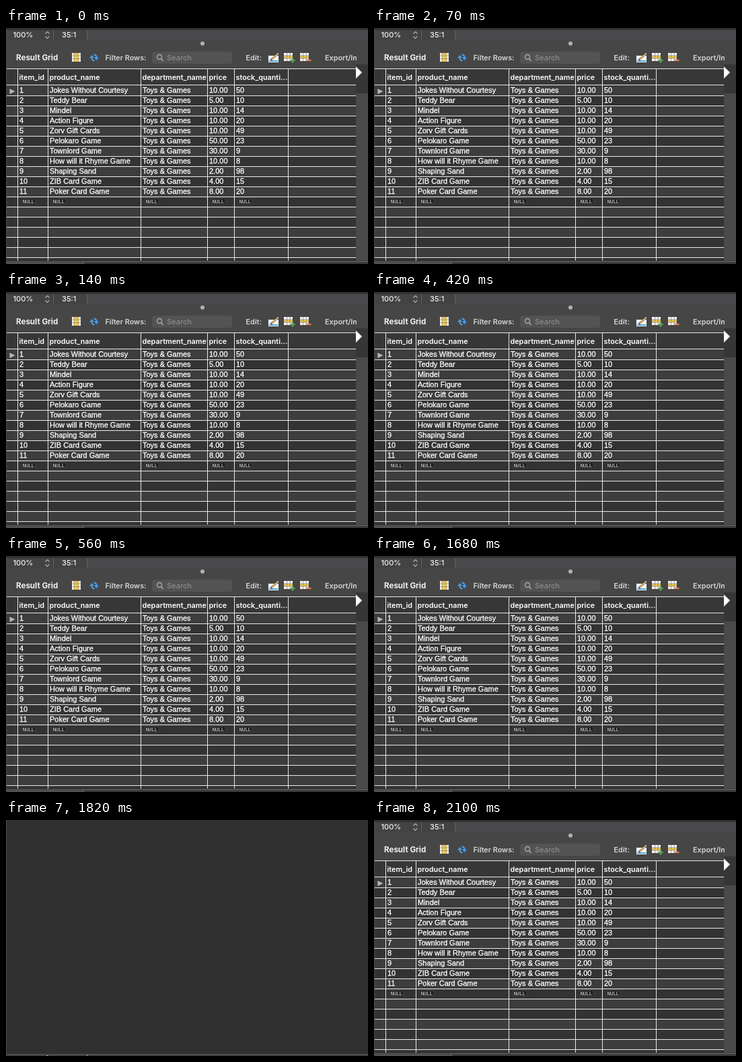
An HTML page for the animation above (2.38 s loop, 538 by 350 pixels).

```html
<!DOCTYPE html>
<html lang="en">
<head>
<meta charset="utf-8">
<title>Result grid</title>
<style>
html, body { margin: 0; width: 100%; height: 100%; overflow: hidden; background: #303030; }
svg { display: block; width: 538px; height: 350px; }
text { white-space: pre; }
.ui { font: 500 11px Inter, sans-serif; fill: #f2f2f2; }
.head { font: 600 10.8px Inter, sans-serif; fill: #fff; }
.label { font: 600 10.8px Inter, sans-serif; fill: #d4d4d4; }
.title { font: 700 11.6px Inter, sans-serif; fill: #f0f0f0; }
.cell { font: 11px "Liberation Sans", Arial, sans-serif; fill: #fff; stroke: #fff; stroke-width: .3px; }
.null { font: 7.2px "DejaVu Sans Mono", monospace; fill: #e4e4e4; }
#panel { animation: blink 2380ms step-end infinite; }
@keyframes blink {
  0% { visibility: visible; }
  76.4706% { visibility: hidden; }
  88.2353%, 100% { visibility: visible; }
}
</style>
</head>
<body>
<svg viewBox="0 0 538 350">
  <defs>
    <clipPath id="toolClip"><path d="M0 0H521V60H0z"/></clipPath>
    <g id="rows">
      <path fill="#f4f4f4" d="M0 0h13v12H0z"/>
      <path fill="#edc64a" d="M0 4h13v4H0z"/>
      <path stroke="#8b8b8b" stroke-width=".8" d="M0 4h13M0 8h13M4.5 0v12M9 0v12"/>
    </g>
  </defs>

  <!-- empty window -->
  <path fill="#303030" d="M0 0H538V350H0z"/>
  <path fill="#4a4a4a" d="M0 0h1v350H0z"/>
  <path fill="#585858" d="M0 347h538v1H0z"/>
  <path fill="#404040" d="M0 348h538v2H0z"/>
  <path fill="#a0a0a0" d="M60 349h3v1h-3zM120 348h1v2h-1z"/>

  <g id="panel">
    <!-- status bar and toolbar -->
    <path fill="#434343" d="M1 3H120V18H1z"/>
    <path fill="#4a4a4d" d="M120 3H538V18H120z"/>
    <path fill="#464646" d="M1 18H538V61H1z"/>
    <path fill="#606060" d="M70 3h1v15h-1zM120 3h1v15h-1z"/>
    <text class="ui" x="10.5" y="14">100%</text>
    <path fill="none" stroke="#b5b5b5" stroke-width="1.1" d="M58.5 8.5l3-3 3 3M58.5 12.5l3 3 3-3"/>
    <text class="ui" x="83" y="14">35:1</text>
    <circle cx="292" cy="23" r="3" fill="#b4b4b4"/>

    <g clip-path="url(#toolClip)">
      <text class="title" x="15" y="48">Result Grid</text>
      <text class="label" x="147.5" y="48">Filter Rows:</text>
      <text class="label" x="356.5" y="48">Edit:</text>
      <text class="label" x="474" y="48">Export/Import:</text>
    </g>

    <path fill="#f4f4f4" d="M98 37h13v13H98z"/>
    <path fill="#edc64a" d="M101 37h7v13h-7z"/>
    <path stroke="#8b8b8b" stroke-width=".7" d="M98 41h13M98 45.5h13M101 37v13M108 37v13"/>

    <path fill="none" stroke="#4c9bea" stroke-width="2" d="M127.5 44q0 4.5 4 4.5M134.5 44q0-4.5-4-4.5"/>
    <path fill="#4c9bea" d="M124 44.5h7l-3.5-4.5zM131 43.5h7l-3.5 4.5z"/>

    <rect x="217" y="35" width="119" height="18" rx="4" fill="#535353"/>
    <circle cx="228" cy="43" r="3.5" fill="none" stroke="#b0b0b0" stroke-width="1.3"/>
    <path stroke="#b0b0b0" stroke-width="1.4" d="M230.5 45.5l3 3.5"/>
    <text class="ui" x="239" y="48" style="fill:#8c8c8c">Search</text>

    <path fill="#f4f4f4" d="M390 41h15v10h-15z"/>
    <path fill="#5ba0de" d="M391 48h13v2h-13z"/>
    <path stroke="#555" stroke-width="2.8" d="M393.5 47.5l11.5-10"/>
    <path stroke="#e3b468" stroke-width="1.8" d="M395 46.2l10-8.7"/>

    <use href="#rows" x="413" y="37"/>
    <path fill="none" stroke="#6aa84a" stroke-width="2.2" d="M422.5 48h7M426 44.5v7"/>
    <use href="#rows" x="437" y="37"/>
    <path stroke="#e07a48" stroke-width="2.2" d="M446.5 48h7"/>

    <!-- table -->
    <path fill="#373737" d="M1 61H520V85H1z"/>
    <path fill="#333" d="M1 85H520V345H1z"/>
    <g id="table"></g>
    <path fill="#b5b5b5" d="M5.5 90v8l8-4z"/>

    <!-- side strip and bottom edge -->
    <path fill="#363636" d="M520 54h18v43h-18z"/>
    <path fill="#4a4a4a" d="M520 97h18v248h-18z"/>
    <path fill="#fff" d="M520 57v18l9-9z"/>
    <path fill="#393939" d="M1 345H538V350H1z"/>
    <path fill="#505050" d="M1 346H115V350H1z"/>
    <path fill="#6a6a6a" d="M115 346H538V347H116V350H115z"/>
  </g>
</svg>
<script>
const table = document.getElementById("table");
const lineColor = "#e8e8e8";

function add(tag, attrs, content = "") {
  const el = document.createElementNS("http://www.w3.org/2000/svg", tag);
  for (const key in attrs) el.setAttribute(key, attrs[key]);
  el.textContent = content;
  table.append(el);
}

function rect(x, y, width, height, fill) {
  add("rect", { x, y, width, height, fill });
}

const columns = [
  [17, "item_id"], [62, "product_name"], [200, "department_name"],
  [299, "price"], [339, "stock_quanti..."]
];
const items = [
  ["Jokes Without Courtesy", "10.00", 50],
  ["Teddy Bear", "5.00", 10],
  ["Mindel", "10.00", 14],
  ["Action Figure", "10.00", 20],
  ["Zorv Gift Cards", "10.00", 49],
  ["Pelokaro Game", "50.00", 23],
  ["Townlord Game", "30.00", 9],
  ["How will it Rhyme Game", "10.00", 8],
  ["Shaping Sand", "2.00", 98],
  ["ZIB Card Game", "4.00", 15],
  ["Poker Card Game", "8.00", 20]
];

// every other row is lighter
for (let y = 85; y < 345; y += 30) rect(1, y, 519, 15, "#3d3d3d");

rect(1, 60, 519, 1, lineColor);
rect(1, 84, 519, 1, lineColor);
for (let y = 100; y < 345; y += 15) rect(1, y, 519, 1, lineColor);
for (const x of [...columns.map(c => c[0]), 419]) rect(x, 61, 1, 284, lineColor);

for (const [x, title] of columns) {
  add("text", { x: x + 2.5, y: 77, class: "head" }, title);
  add("rect", { x: x + 6, y: 253, width: 21, height: 9, rx: 2, fill: "#222", stroke: "#555", "stroke-width": .6 });
  add("text", { x: x + 7.8, y: 260.2, class: "null" }, "NULL");
}
items.forEach(([name, price, stock], i) => {
  [i + 1, name, "Toys & Games", price, stock].forEach((value, c) => {
    add("text", { x: columns[c][0] + 3, y: 96 + i * 15, class: "cell" }, value);
  });
});
</script>
</body>
</html>
```
